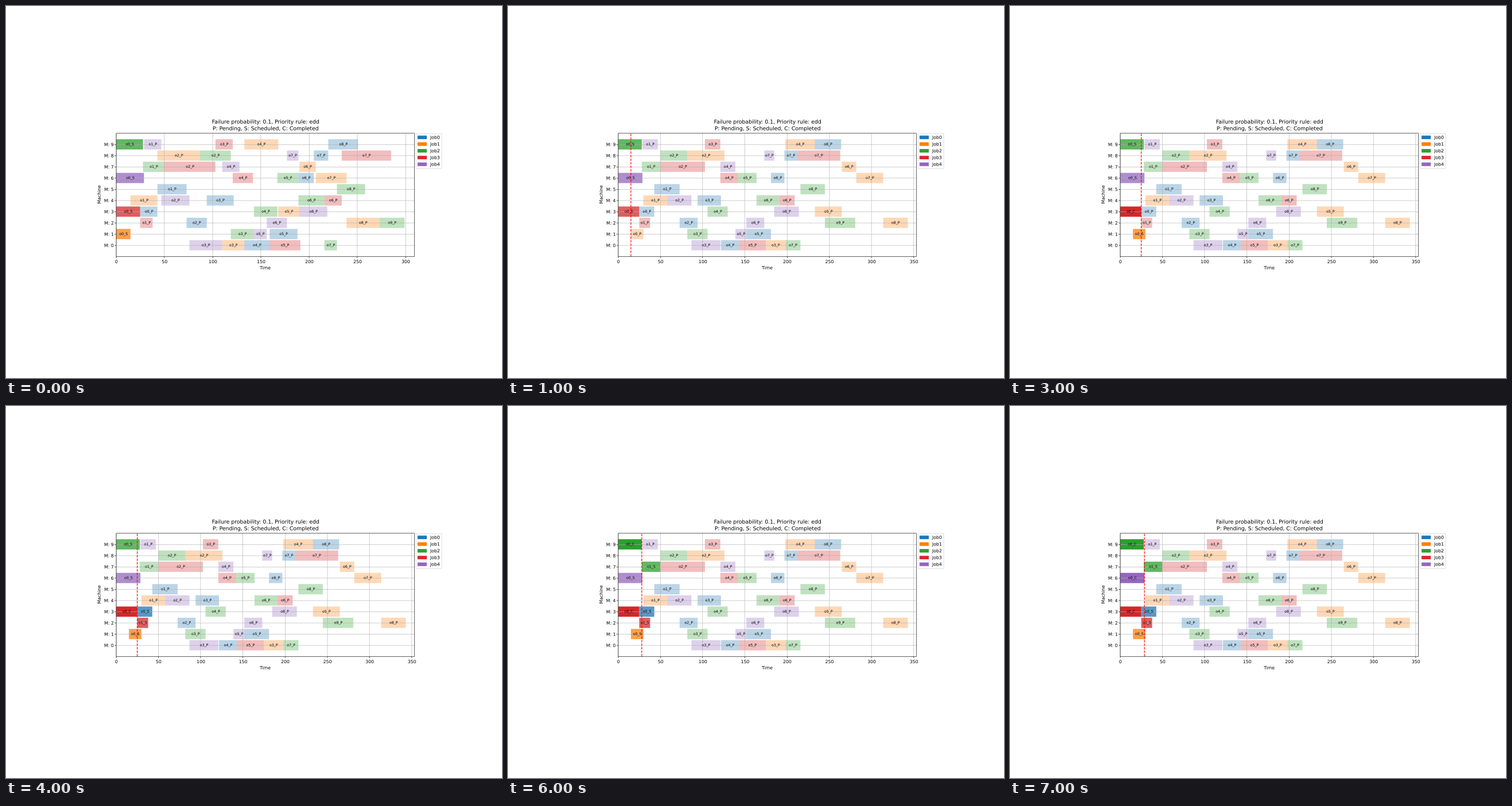
Write a matplotlib script that moves like this. It is 864x648 px and loops after 8000 ms.

```python
from math import floor

import matplotlib.pyplot as plt
from matplotlib.animation import FuncAnimation
from matplotlib.patches import FancyBboxPatch, PathPatch, Rectangle
from matplotlib.textpath import TextPath
from matplotlib.transforms import Affine2D

plt.rcParams["path.snap"] = False
plt.rcParams["font.family"] = "DejaVu Sans"

# The chart is a 1200 x 500 sheet shrunk onto the stage; units are sheet pixels
W, H = 864, 648
SHEET_X, SHEET_Y = 108, 188
SCALE_X, SCALE_Y = 670 / 1200, 279 / 500
LEFT, RIGHT, TOP, BOTTOM = 150, 1080, 60, 445
ROW = (BOTTOM - TOP) / 11
PT = 100 / 72
THIN, MEDIUM, THICK = (w * PT * SCALE_Y for w in (0.8, 1, 1.5))

COLORS = ["tab:blue", "tab:orange", "tab:green", "tab:red", "tab:purple"]
ALPHA = {"P": 0.3, "S": 0.75, "C": 1.0}

# Machine visited by each operation of a job, and how long it takes
ROUTES = ["352401689", "148093762", "9781364052", "32796048", "694071283"]
TIMES = [
    [18, 30, 21, 28, 26, 29, 16, 15, 31],
    [15, 28, 44, 23, 35, 22, 17, 32, 34],
    [28, 22, 32, 24, 24, 22, 27, 13, 29, 26],
    [25, 13, 53, 18, 21, 32, 18, 51],
    [29, 18, 29, 34, 18, 13, 21, 12, 29],
]
NEW_TIMES = {(0, 4): 21, (1, 5): 32, (1, 8): 29, (2, 7): 18, (2, 9): 36}

# Job order on machines 0 to 9
QUEUES = "41032 1240 30412 30214 14023 02 43201 2341 12403 24310".split()
NEW_QUEUES = "40312 1240 30421 30241 14023 02 43201 2341 21403 24310".split()

NOW = [None, 15, 15, 25, 25, 28, 28, 29]
EVENTS = [
    {(1, 0): "S", (2, 0): "S", (3, 0): "S", (4, 0): "S"},
    {(1, 0): "P"},
    {(1, 0): "S"},
    {(3, 0): "C"},
    {(0, 0): "S", (3, 1): "S"},
    {(2, 0): "C"},
    {(2, 1): "S"},
    {(4, 0): "C"},
]


def schedule(queues, changed, release):
    """Start every operation as soon as its job and machine are free."""
    job_free = [release.get(j, 0) for j in range(5)]
    machine_free = [0] * 10
    step = [0] * 5
    waiting = [[int(c) for c in q] for q in queues]
    bars = []
    while any(waiting):
        for m, queue in enumerate(waiting):
            if not queue:
                continue
            job = queue[0]
            op = step[job]
            if int(ROUTES[job][op]) != m:
                continue
            start = max(job_free[job], machine_free[m])
            end = start + changed.get((job, op), TIMES[job][op])
            bars.append((job, op, m, start, end))
            job_free[job] = machine_free[m] = end
            step[job] += 1
            queue.pop(0)
    return bars


FIRST_PLAN = schedule(QUEUES, {}, {})
NEW_PLAN = schedule(NEW_QUEUES, NEW_TIMES, {1: 15})

fig = plt.figure(figsize=(W / 72, H / 72), dpi=72, facecolor="white")
ax = fig.add_axes([0, 0, 1, 1])


def edge(v):
    """Nearest pixel edge of the sheet."""
    return floor(v + 0.5)


def middle(v):
    """Centre line for a stroke one sheet pixel wide."""
    return edge(v) + 0.5


def text(x, y, s, size, ha="center", angle=0):
    """Place text by its ink width, with y as the baseline."""
    path = TextPath((0, 0), s, size=size * PT)
    shift = path.get_extents().width * {"left": 0, "center": 0.5, "right": 1}[ha]
    place = Affine2D().translate(-shift, 0).scale(1, -1).rotate_deg(-angle).translate(x, y)
    ax.add_patch(PathPatch(place.transform_path(path), fc="black", lw=0, zorder=3))


def line(x0, y0, x1, y1, color="black", lw=THIN, z=2.5, style="-"):
    ax.plot([x0, x1], [y0, y1], color=color, lw=lw, ls=style, zorder=z,
            solid_capstyle="butt")


def row_y(machine):
    return BOTTOM - (machine + 1) * ROW


def draw_axes(end, to_x):
    tick = 3.5 * PT
    for t in range(0, end + 1, 50):
        x = middle(to_x(t))
        line(x, BOTTOM, x, TOP, "#b0b0b0", z=1.5)
        line(x, BOTTOM, x, BOTTOM + tick)
        text(to_x(t), 466, str(t), 10)
    for m in range(10):
        y = middle(row_y(m))
        line(LEFT, y, RIGHT, y, "#b0b0b0", z=1.5)
        line(LEFT - tick, y, LEFT, y)
        text(LEFT - 7 * PT, row_y(m) + 5.5, f"M: {m}", 10, "right")
    ax.add_patch(Rectangle((middle(LEFT), middle(TOP)), RIGHT - LEFT, BOTTOM - TOP,
                           fill=False, ec="black", lw=THIN, zorder=2.5))
    mid = (LEFT + RIGHT) / 2
    text(mid, 485, "Time", 10)
    text(102, (TOP + BOTTOM) / 2, "Machine", 10, angle=90)
    text(mid, 30, "Failure probability: 0.1, Priority rule: edd", 12)
    text(mid, 51, "P: Pending, S: Scheduled, C: Completed", 12)


def draw_legend():
    x, y, em = 1085.5, 61.5, 10 * PT
    ax.add_patch(FancyBboxPatch((x, y), 80.5, 109, fc="white", ec="#cccccc",
                                boxstyle=f"round,pad=0,rounding_size={0.2 * em}",
                                lw=MEDIUM, alpha=0.8, zorder=2))
    for j, color in enumerate(COLORS):
        base = y + 16.5 + 21 * j
        ax.add_patch(Rectangle((x + 0.4 * em, base - 0.7 * em), 2 * em, 0.7 * em,
                               fc=color, ec=color, lw=MEDIUM, zorder=3))
        text(x + 3.2 * em, base, f"Job{j}", 10, "left")


def draw(i):
    ax.cla()
    ax.set_xlim(-SHEET_X / SCALE_X, (W - SHEET_X) / SCALE_X)
    ax.set_ylim((H - SHEET_Y) / SCALE_Y, -SHEET_Y / SCALE_Y)
    ax.set_autoscale_on(False)
    ax.axis("off")

    plan = NEW_PLAN if i else FIRST_PLAN
    end = max(bar[4] for bar in plan) + 10
    status = {}
    for event in EVENTS[:i + 1]:
        status.update(event)

    def to_x(t):
        return LEFT + t * (RIGHT - LEFT) / end

    draw_axes(end, to_x)
    draw_legend()
    for job, op, m, t0, t1 in plan:
        state = status.get((job, op), "P")
        x0, x1 = edge(to_x(t0)), edge(to_x(t1))
        y0, y1 = edge(row_y(m) - 0.45 * ROW), edge(row_y(m) + 0.45 * ROW)
        ax.add_patch(Rectangle((x0, y0), x1 - x0, y1 - y0,
                               fc=COLORS[job], lw=0, alpha=ALPHA[state], zorder=1))
        text(to_x((t0 + t1) / 2), row_y(m) + 3, f"o{op}_{state}", 8)
    if NOW[i] is not None:
        x = edge(to_x(NOW[i]))
        line(x, BOTTOM, x, TOP, "red", THICK, 2, "--")
    return []


anim = FuncAnimation(fig, draw, frames=len(NOW), interval=1000, repeat=True, blit=False)
plt.show()
```
